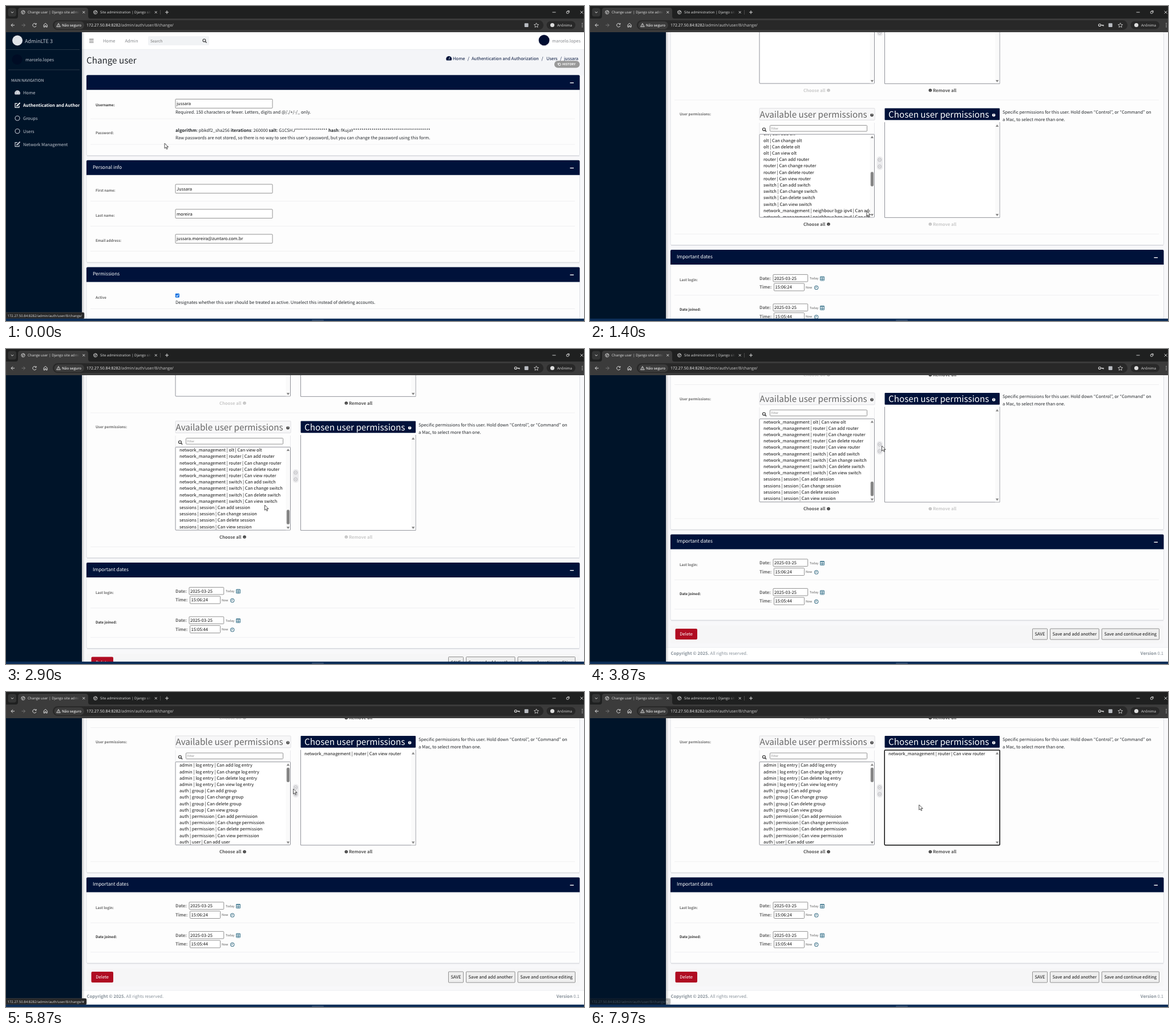
Recreate the animation shown at these times as an HTML page. Size 1013 by 553 pixels, loop 8 s.

```html
<!DOCTYPE html>
<html lang="en">
<head>
<meta charset="utf-8">
<title>Change user</title>
<style>
html, body { margin: 0; width: 100%; height: 100%; overflow: hidden; background: #fcfcfd; }
svg { display: block; width: 1013px; height: 553px; }
text { white-space: pre; text-rendering: geometricPrecision;
  font-family: "Noto Sans CJK JP", "Noto Sans CJK SC", "Noto Sans CJK KR", "Noto Sans CJK TC", "Noto Sans", sans-serif; }
.ui { font-family: "Open Sans", "Noto Sans", sans-serif; }
.b { font-weight: 700; }
</style>
</head>
<body>
<svg id="stage" viewBox="0 0 1013 553"></svg>
<script>
const NAVY = '#00123a', SIDE = '#001429', INK = '#24282c', GREY = '#666';
const LOOP = 8000;

// ---- drawing helpers (y of text is its middle) ----
const text = (x, y, s, o = {}) => {
  const size = o.size || 8.5;
  return `<text x="${x}" y="${y + size * 0.33}" font-size="${size / 1.117}" fill="${o.fill || INK}"` +
    ` class="${o.bold ? 'b' : ''}" text-anchor="${o.anchor || 'start'}">${s}</text>`;
};
const ui = (x, y, s, size, fill = '#e4e4e4', weight = 400) =>
  `<text class="ui" x="${x}" y="${y + size * 0.36}" font-size="${size}" fill="${fill}" font-weight="${weight}">${s}</text>`;
const rect = (x, y, x2, y2, fill, r = 0, more = '') =>
  `<rect x="${x}" y="${y}" width="${x2 - x}" height="${y2 - y}" rx="${r}" fill="${fill}" ${more}/>`;
const line = (d, c, w = 1, more = '') => `<path d="${d}" fill="none" stroke="${c}" stroke-width="${w}" ${more}/>`;
const dot = (x, y, r, fill, more = '') => `<circle cx="${x}" cy="${y}" r="${r}" fill="${fill}" ${more}/>`;
const ring = (x, y, r, c, w = 1) => dot(x, y, r, 'none', `stroke="${c}" stroke-width="${w}"`);
const shape = (d, c) => `<path d="${d}" fill="${c}"/>`;
const lens = (x, y, c, r = 2.4) => ring(x - .6, y - .6, r, c, 1.2) + line(`M${x + 1.2} ${y + 1.2}l2.4 2.4`, c, 1.4);
const sep = y => line(`M148 ${y}H997`, '#ececef', .8);
const label = (y, s, fill = GREY) => text(157, y, s, { size: 7, bold: 1, fill });
const input = (x, y, x2, y2, s) =>
  rect(x, y, x2, y2, '#fff', 1, 'stroke="#767676" stroke-width=".8"') + text(x + 2, (y + y2) / 2, s, { fill: '#111' });
const badge = (x, y, s, c, fg) => dot(x, y, 2.8, c) +
  `<text x="${x}" y="${y + 1.7}" font-size="4.8" class="b" text-anchor="middle" fill="${fg}">${s}</text>`;
const edit = (x, y, c) => line(`M${x + 3} ${y + .5}v3.2h-7v-7h4`, c, 1.2) + line(`M${x - 1.5} ${y + 1.5}L${x + 4.5} ${y - 4.5}`, c, 2);
const gauge = (x, y, c) => shape(`M${x - 4.2} ${y + 3.5}a4.9 4.9 0 1 1 8.4 0z`, c) + line(`M${x} ${y + 2}l1.4 -4.2`, '#fff', .8);

function card(top, bottom, title) {
  return rect(141, top, 1005.5, bottom, '#fdfdfd', 2, 'stroke="#d9dbe0" stroke-width=".8"') +
    line(`M142 ${bottom + .8}H1005`, '#d0d2d8', .8) +
    shape(`M141 ${top + 26}v-24q0 -2 2 -2h860.500q2 0 2 2v24z`, NAVY) +
    text(152, top + 11.8, title, { size: 9.36, fill: '#fff' }) +
    line(`M988.500 ${top + 13.7}h6.500`, '#fff', 1.4);
}

function check(y, title, on, help) {
  const box = on
    ? rect(296.8, y - 3.4, 303.8, y + 3.6, '#0b6fe0', 1) + line(`M298.300 ${y + .2}l1.500 1.600 2.600 -3.500`, '#fff', 1.1)
    : rect(297.2, y - 3, 303.4, y + 3.2, '#fff', 1, 'stroke="#767676" stroke-width=".8"');
  return label(y + 3.2, title) + box + text(297, y + 11.8, help) + sep(y + 23.3);
}

const tri = (x, y, up) => shape(`M${x - 2.6} ${y + (up ? 2 : -2)}h5.200l-2.600 ${up ? -4 : 4}z`, '#858585');

// Two-column picker whose titles sit at height y.
function picker(y, key, what, xs, rows, chosen, help, helpX) {
  const off = key === 'g';
  return rect(297, y - 10.5, 499, y + 10.3, '#f7f7f8', 1, 'stroke="#d8d8dc" stroke-width=".8"') +
    text(xs[0], y, 'Available ' + what, { size: 17, fill: GREY }) + badge(xs[1], y + 1.5, '?', '#444', '#fff') +
    rect(516.5, y - 10.5, 718, y + 10.3, NAVY, 1) +
    text(xs[2], y, 'Chosen ' + what, { size: 17, fill: '#fff' }) + badge(xs[3], y + 1.5, '?', '#fff', NAVY) +
    line(`M297 ${y + 15}V${y + 35}M498.500 ${y + 15}V${y + 35}`, '#dedee2', .7) +
    lens(305.5, y + 27, '#333') +
    rect(315.5, y + 19.5, 485.5, y + 30, '#fff', 1, 'stroke="#767676" stroke-width=".8"') +
    text(317.5, y + 24.7, 'Filter', { size: 5.8, fill: '#888' }) +
    rect(297, y + 35.2, 498.5, y + 181, '#fff', 1, `id="${key}Left" stroke="#85878f" stroke-width=".9"`) +
    rect(490.5, y + 36, 498, y + 180.5, '#fafafa') +
    `<clipPath id="${key}Clip">${rect(298, y + 36, 490.5, y + 180.5, '#000')}</clipPath>` +
    `<g clip-path="url(#${key}Clip)"><g id="${key}List">${rows}</g></g>` +
    tri(494.4, y + 40, 1) + (off ? '' : rect(491.8, 0, 497, 25.5, '#858585', 2.4, `id="thumb"`)) + tri(494.4, y + 177, 0) +
    rect(516.5, y + 14.5, 718, y + 181.4, '#fff') +
    line(`M516.500 ${y + 14}V${y + 181.4}H718V${y + 14}`, '#85878f', .9) +
    rect(710, y + 15, 717.4, y + 181, '#fafafa') + tri(713.6, y + 20, 1) + tri(713.6, y + 177, 0) +
    `<g id="${key}Chosen">${text(523, y + 20.6, chosen, { fill: '#111' })}</g>` +
    rect(502.5, y + 74, 513, y + 98, '#ececee', 5) +
    [80, 91.8].map((d, i) => ring(507.6, y + d, 3, '#b9b9bd') +
      line(`M${506} ${y + d}h3.200`, '#b9b9bd', 1) + (i ? '' : `<g id="${key}Arrow" opacity="0">${ring(507.6, y + d, 3, '#444')}</g>`)).join('') +
    `<g opacity="${off ? .3 : 1}">${text(374, y + 193, 'Choose all', { bold: 1, fill: '#555' })}${badge(418, y + 193, '›', '#444', '#fff')}</g>` +
    `<g id="${key}Remove">${badge(596.3, y + 193, '‹', '#444', '#fff')}${text(601, y + 193, 'Remove all', { bold: 1, fill: '#555' })}</g>` +
    help.map((s, i) => text(helpX, y - 4 + i * 12.8, s)).join('');
}

function moment(y, title, time, fill) {
  return label(y, title, fill) +
    text(297, y - 3, 'Date:', { bold: 1, fill: GREY }) + input(321, y - 9.6, 381.7, y + 3, '2025-03-25') +
    text(385, y - 2.8, 'Today', { size: 6, fill: '#555' }) +
    rect(403.5, y - 6, 410.5, y + 1, '#dfe9ee', .5, 'stroke="#457b91" stroke-width=".9"') +
    line(`M403.500 ${y - 4.8}h7M403.500 ${y - 1.4}h7M407 ${y - 4}v5`, '#457b91', 1) +
    text(297, y + 12.6, 'Time:', { bold: 1, fill: GREY }) + input(322.5, y + 6, 375.5, y + 19, time) +
    text(378, y + 13, 'Now', { size: 6, fill: '#555' }) +
    ring(396.7, y + 13.4, 3.1, '#3f738a', 1.1) + line(`M396.700 ${y + 11.4}v2.200h-1.600`, '#3f738a', .9) +
    sep(y + 26.7);
}

const button = (x, x2, s) => rect(x, 1285.5, x2, 1304.5, '#efefef', 1, 'stroke="#767676" stroke-width=".8"') +
  text((x + x2) / 2, 1295, s, { anchor: 'middle', fill: '#111' });

// ---- permission list ----
const ROW = 11.2, PERM_Y = 882;
const models = ['neighbour bgp ipv4', 'neighbour bgp ipv6', 'olt', 'router', 'switch'];
const perms = [
  ...['admin | log entry', 'auth | group', 'auth | permission', 'auth | user', 'contenttypes | content type'].map(s => [s, s.split(' | ')[1]]),
  ...models.map(m => [m, m]),
  ...models.map(m => ['network_management | ' + m, m]),
  ['sessions | session', 'session']
].flatMap(([path, m]) => ['add', 'change', 'delete', 'view'].map(a => `${path} | Can ${a} ${m}`));
const picked = perms.indexOf('network_management | router | Can view router');
const listMax = perms.length * ROW - 145;
const rowY = i => PERM_Y + 41 + i * ROW;
const rows = `<g id="mark">${rect(298, rowY(picked) - 5.6, 490.5, rowY(picked) + 5.6, '#cecece')}</g>` +
  perms.map((s, i) => text(304, rowY(i), s, { fill: '#111' })).join('');

// ---- page ----
const user = 'marcelo.lopes', SOFT = '#c2c7d0', MUTED = '#85888c';
const menu = [[152, 'Home', gauge], [174.5, 'Authentication and Authorization', edit], [197.3, 'Groups'], [220, 'Users'], [243, 'Network Management', edit]];
const sidebar = dot(20, 60.5, 9, '#dfe3e8') + text(33, 61.5, 'AdminLTE 3', { size: 10.1, fill: SOFT }) +
  line('M0 76.500H133', '#2f4050', .8) + dot(19.5, 94, 9, '#000c24') + text(34, 94.5, user, { fill: SOFT }) +
  line('M4 112H129', '#34424f', .8) + text(9, 130.2, 'MAIN NAVIGATION', { size: 7.6, fill: '#d0d4db' }) +
  menu.map(([y, s, icon], i) => {
    const c = i === 1 ? '#fff' : SOFT;
    return (icon ? icon(20, y, c) : ring(20, y - .3, 4, c, 1.1)) + text(30, y, s, { fill: c, bold: i === 1 });
  }).join('');

const navbar = rect(133, 46, 1013, 76, '#fff') + line('M133 76.300H1013', '#e0e3e7', .7) + rect(133, 76.6, 1013, 122, '#f4f5f8') +
  line('M146 58.400h7.500M146 61.200h7.500M146 64h7.500', '#666', 1.1) +
  text(170, 61.5, 'Home', { fill: MUTED }) + text(208.5, 61.5, 'Admin', { fill: MUTED }) +
  rect(249, 53, 356, 69, '#f1f3f5', 2) + text(253, 61.3, 'Search', { size: 7.5, fill: '#777' }) + lens(348, 61, '#444') +
  dot(943, 60.3, 10.2, '#dcdde2') + dot(943, 60, 9.3, '#000c30') + text(957, 61.5, user, { fill: MUTED }) +
  text(141, 95, 'Change user', { size: 17 }) + gauge(776.3, 92, NAVY) +
  [[783, 'Home'], [809, '/'], [816, 'Authentication and Authorization'], [938.5, '/'], [947, 'Users'], [971, '/'], [978, 'jussara']]
    .map(([x, s]) => text(x, 92.3, s, { fill: NAVY })).join('') +
  rect(961, 96.3, 1005.5, 108.5, '#999', 6) + ring(970, 102.4, 2.2, '#fff', .9) +
  line('M967.300 100v2.200h2', '#fff', .9) + text(975, 102.4, 'HISTORY', { size: 6, fill: '#fff', bold: 1 });

const bold = s => `<tspan class="b">${s}</tspan>`;
const page = navbar + card(121.2, 262.5, '') + label(174, 'Username:', '#333') + input(297, 163.5, 467, 179.3, 'jussara') +
  text(297, 186.2, 'Required. 150 characters or fewer. Letters, digits and @/./+/-/_ only.') + sep(198) +
  label(222.6, 'Password:') +
  text(297, 218.3, `${bold('algorithm')}: pbkdf2_sha256 ${bold('iterations')}: 260000 ${bold('salt')}: G1CSHJ${'*'.repeat(16)} ${bold('hash')}: fKujaY${'*'.repeat(38)}`) +
  text(297, 231.2, 'Raw passwords are not stored, so there is no way to see this user’s password, but you can change the password using this form.') + sep(243) +
  card(270.8, 450, 'Personal info') +
  [['First name:', 'Jussara'], ['Last name:', 'moreira'], ['Email address:', 'jussara.moreira@zuntaro.com.br']].map(([k, v], i) => {
    const y = 323.6 + i * 43.9;
    return label(y, k) + input(297, y - 10.6, 467, y + 5, v) + sep(y + 19);
  }).join('') +
  card(458.4, 1111.5, 'Permissions') +
  check(508.2, 'Active', 1, 'Designates whether this user should be treated as active. Unselect this instead of deleting accounts.') +
  check(553.4, 'Staff status', 1, 'Designates whether the user can log into this admin site.') +
  check(598.6, 'Superuser status', 0, 'Designates that this user has all permissions without explicitly assigning them.') +
  label(647, 'Groups:') +
  picker(647, 'g', 'groups', [333.5, 459, 558, 672], '', 'View Only', ['The groups this user belongs to. A user will get all permissions granted to',
    'each of their groups. Hold down “Control”, or “Command” on a Mac, to', 'select more than one.'], 729) +
  line('M723.500 644.200h5M726 641.700v5', '#6cc04a', 1.3) + sep(857) +
  label(PERM_Y, 'User permissions:') +
  picker(PERM_Y, 'p', 'user permissions', [297.6, 494, 523, 707.6], rows, perms[picked],
    ['Specific permissions for this user. Hold down “Control”, or “Command” on', 'a Mac, to select more than one.'], 723) +
  rect(516.2, PERM_Y + 14.6, 718.2, PERM_Y + 181.3, 'none', 1.5, 'id="focus" stroke="#101010" stroke-width="1.5"') + sep(1092.3) +
  card(1120, 1270.5, 'Important dates') + moment(1173, 'Last login:', '15:06:24', GREY) + moment(1224.5, 'Date joined:', '15:05:44', '#333') +
  rect(141, 1280, 1005.5, 1311.5, '#f6f6f7', 2) + rect(149.5, 1285.5, 188, 1304.5, '#b00c22', 2) +
  text(168.7, 1295, 'Delete', { fill: '#fff', anchor: 'middle' }) +
  button(775.5, 801.5, 'SAVE') + button(806.5, 892, 'Save and add another') + button(897, 997.5, 'Save and continue editing') +
  rect(133, 1318.5, 1013, 1350, '#fff') + line('M133 1318.500H1013', '#e6e8ec', .7) +
  text(141.5, 1328.7, bold('Copyright © 2025.') + ' All rights reserved.', { fill: '#869099' }) +
  text(1005, 1328.7, bold('Version') + ' 0.1', { fill: '#869099', anchor: 'end' });

// ---- browser frame ----
const cross = (x, y, r, c) => line(`M${x - r} ${y - r}l${2 * r} ${2 * r}m0 ${-2 * r}l${-2 * r} ${2 * r}`, c, .9);
const globe = (x, y) => ring(x, y, 3.2, '#c8c8c8', .9) + line(`M${x - 3} ${y - 1}l3 1 -1 3M${x} ${y - 3}l1 2 2 .5`, '#c8c8c8', 1);
const fade = (x, c) => rect(x, 5, x + 14, 17, `url(#${c})`);
const grad = (id, c) => `<linearGradient id="${id}"><stop offset="0" stop-color="${c}" stop-opacity="0"/><stop offset=".85" stop-color="${c}"/></linearGradient>`;
const url = '172.27.50.84:8282/admin/auth/user/8/change/', LIGHT = '#dcdcdc';
const frame = rect(0, 0, 1013, 46, '#1f2020') + rect(0, 22, 1013, 46, '#3b3b3b') +
  grad('onFade', '#3b3b3b') + grad('offFade', '#1f2020') +
  shape('M17 22q4 0 4 -4v-10q0 -5 5 -5h113q5 0 5 5v10q0 4 4 4z', '#3b3b3b') +
  rect(3.5, 3.5, 18, 18.5, '#343535', 4) + line('M8.800 10l2.200 2.200 2.200 -2.200', LIGHT) +
  globe(30, 11) + ui(38, 11, 'Change user | Django site admin', 6.1) + fade(117, 'onFade') + cross(136.3, 11, 2, LIGHT) +
  globe(156.7, 11) + ui(165, 11, 'Site administration | Django site', 6.1) + fade(243, 'offFade') + cross(262.7, 11, 2, LIGHT) +
  line('M270.500 7v8', '#555', .8) + line('M279 11h6M282 8v6', LIGHT) +
  line('M957.500 11h6', LIGHT, .9) + rect(982.4, 9.5, 986, 13, 'none', .6, `stroke="${LIGHT}" stroke-width=".9"`) +
  line('M984 8.400h3.200v3.200', LIGHT, .9) + cross(1009, 11, 2.4, LIGHT) +
  line('M15 33.700H9m3 -3l-3 3 3 3', LIGHT) + line('M27.500 33.700h6m-3 -3l3 3 -3 3', '#777') +
  line('M52.600 31.800a3.200 3.200 0 1 0 .4 3M53 30v2.300h-2.300', LIGHT) +
  line('M66.200 37v-4l3 -2.600 3 2.600v4h-2v-2.400h-2v2.400z', LIGHT) +
  rect(82, 25, 942, 42, '#282828', 8.5) + rect(84.5, 27, 137, 40.5, '#3b3b3b', 6.7) +
  line('M92 30.400l3.300 6h-6.600z', LIGHT, .9) + line('M92 32.600v2M92 35.100v.8', LIGHT, .8) +
  ui(98, 33.5, 'Não seguro', 6.2, '#e4e4e4', 600) +
  ui(141, 33.5, url.replace('/', '<tspan fill="#d0d0d0">/') + '</tspan>', 7, '#f0f0f0') +
  `<g id="key">${ring(893.3, 33.5, 2, LIGHT, 1.2)}${line('M895.300 33.500h4.500v2M898 33.500v1.600', LIGHT, 1.2)}</g>` +
  rect(908.7, 30.2, 915.5, 37, '#b9bcc2', 1) +
  line('M929.500 29.800l1.200 2.600 2.800 .3 -2.100 1.900 .6 2.800 -2.500 -1.400 -2.500 1.400 .6 -2.800 -2.100 -1.900 2.800 -.3z', LIGHT, .8) +
  rect(947.5, 26.5, 998, 40.5, '#282828', 7) + dot(957.5, 33.5, 3.6, LIGHT) + ui(966, 33.5, 'Anônima', 6.2, '#e4e4e4', 500) +
  [30.5, 33.5, 36.5].map(y => dot(1010, y, .8, LIGHT)).join('');

const tip = (id, w, s) => `<g id="${id}">${rect(-3, 538, w, 549, '#262728', 2, 'stroke="#4a4b4c" stroke-width=".6"')}${ui(2.5, 543.5, s, 6, '#dedede')}</g>`;

document.getElementById('stage').innerHTML =
  rect(0, 0, 1013, 553, '#f8f8fa') + rect(0, 46, 133, 553, SIDE) +
  '<linearGradient id="shade"><stop stop-color="#999" stop-opacity=".5"/><stop offset="1" stop-color="#999" stop-opacity="0"/></linearGradient>' +
  `<clipPath id="sideClip">${rect(0, 46, 129, 549, '#000')}</clipPath><g clip-path="url(#sideClip)"><g id="side">${sidebar}</g></g>` +
  `<g id="page">${page}</g>` + rect(133, 46, 138, 549, 'url(#shade)') + frame +
  tip('tipA', 137, url) + tip('tipB', 141, url + '#') +
  rect(0, 548.8, 1013, 553, '#0c2d57') + rect(536, 550.5, 557, 553, '#2f4a6d', 1) +
  `<g id="mouse"><path d="M0 0v9l2.100 -1.900 1.500 3.300 1.500 -.7 -1.500 -3.200h2.900z" fill="#fff" stroke="#222" stroke-width=".8" stroke-linejoin="round"/></g>`;

// ---- motion ----
const $ = id => document.getElementById(id);
const clamp = v => Math.max(0, Math.min(1, v));
const smooth = u => u * u * (3 - 2 * u);
// keys: [time, ...values]
function track(t, keys, ease = smooth) {
  let i = 0;
  while (i < keys.length - 2 && t >= keys[i + 1][0]) i++;
  const a = keys[i], b = keys[i + 1], u = ease(clamp((t - a[0]) / (b[0] - a[0])));
  return a.slice(1).map((v, k) => v + (b[k + 1] - v) * u);
}
const linear = u => u;
const pageKeys = [[0, 0], [270, 0], [670, 266], [1060, 692], [2150, 692], [2300, 745], [3400, 745], [3550, 794.5]];
const listKeys = [[0, 0], [1080, 0], [1400, 319], [1680, listMax]];
const mouseKeys = [[0, 278, 241], [120, 278, 241], [670, 442.5, 326], [1080, 483, 358], [1400, 485, 360], [1750, 484, 358],
  [2500, 454, 274], [2900, 453.5, 274], [3400, 462, 240], [3870, 511.5, 170], [4450, 440, 171], [4800, 440, 171],
  [5250, 503.5, 170], [7500, 503.5, 170], [7820, 576.7, 198], [8000, 576.7, 198]];
const MARK = 4600, MOVE = 5500, FOCUS = 7850;

function draw(t) {
  const y = track(t, pageKeys, linear)[0], moved = t >= MOVE, marked = t >= MARK && !moved;
  const list = moved ? 0 : track(t, listKeys, linear)[0];
  const show = (id, v) => $(id).setAttribute('opacity', +v);
  const move = (id, a, b) => $(id).setAttribute('transform', `translate(${a} ${b})`);
  move('page', 0, -y);
  move('side', 0, -y);
  move('pList', 0, -list);
  move('thumb', 0, PERM_Y + 45.3 + list / listMax * 100);
  move('mouse', ...track(t, mouseKeys));
  show('mark', marked);
  show('pArrow', marked);
  $('pLeft').setAttribute('stroke', marked ? '#101010' : '#85878f');
  show('pChosen', moved);
  show('pRemove', moved ? 1 : .3);
  show('focus', t >= FOCUS);
  show('key', t >= 400);
  show('tipA', clamp((350 - t) / 250));
  show('tipB', t < 5200 ? 0 : clamp((8010 - t) / 130));
}

const start = performance.now();
function tick() {
  draw((performance.now() - start) % LOOP);
  requestAnimationFrame(tick);
}
tick();
</script>
</body>
</html>
```
